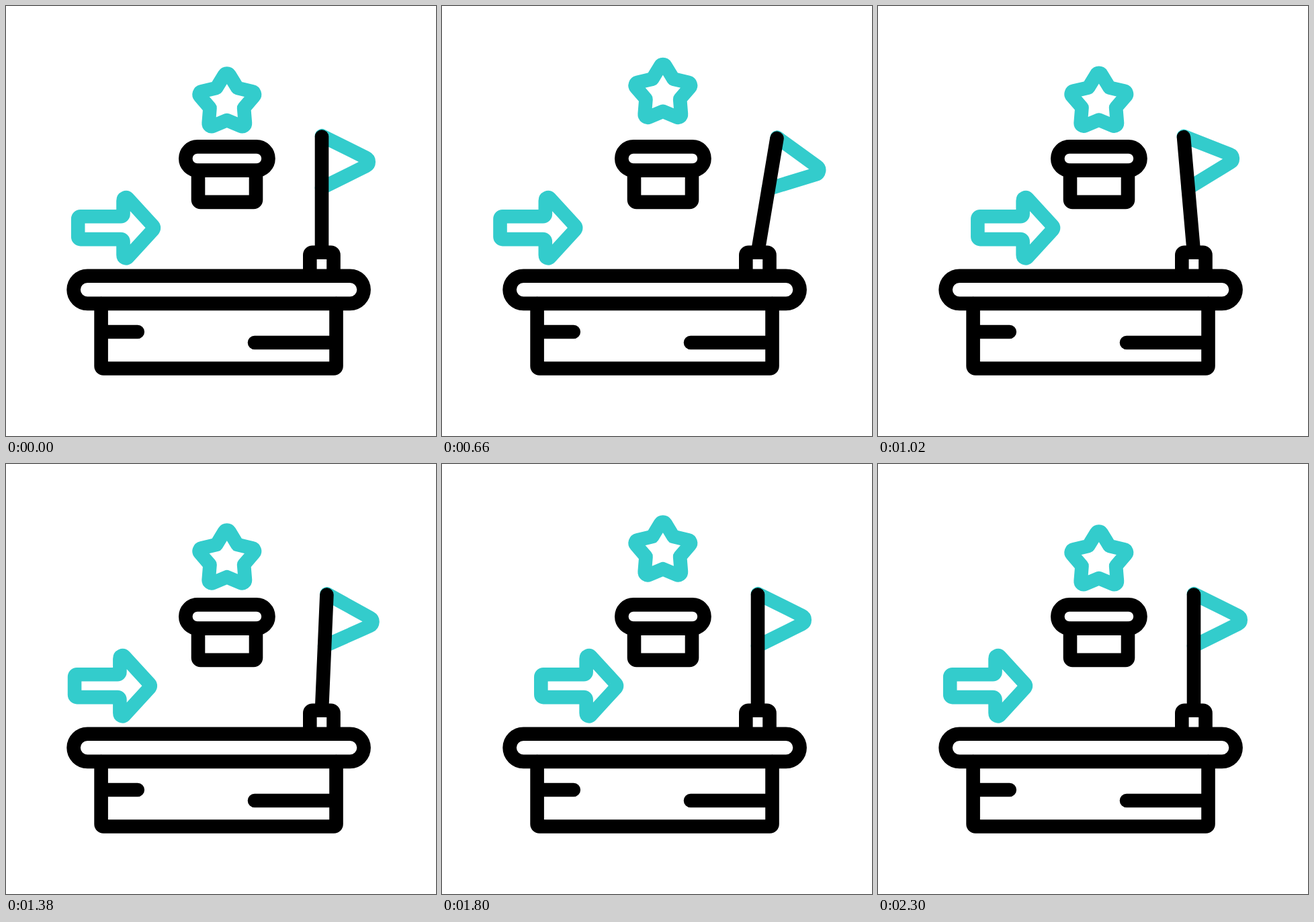
An HTML page that plays this animation: 640 by 640 pixels, repeating every 2400 ms.

```html
<!DOCTYPE html>
<html lang="en">
<head>
<meta charset="utf-8">
<title>Platform level</title>
<style>
  html, body { margin: 0; width: 100%; height: 100%; overflow: hidden; background: #fff; }
  svg { display: block; width: 100vw; height: 100vh; }
  g { fill: none; stroke-width: 20.6; stroke-linecap: round; stroke-linejoin: round; }
  .dark { stroke: #000; }
  .teal { stroke: #3cc; }
</style>
</head>
<body>
<svg viewBox="0 0 640 640">
  <g class="teal">
    <path id="star"/>
    <path id="arrow" d="M110.7 313.3H171a3.5 3.5 0 0 0 3.5-3.5V290c0-4.4 4.2-6.2 7.1-3.4L218.5 326.9q2.8 3.3 0 6.6L181.6 373.8c-2.9 2.8-7.1 1-7.1-3.4V350.6a3.5 3.5 0 0 0-3.5-3.5H110.7a3.5 3.5 0 0 1-3.5-3.5V316.8a3.5 3.5 0 0 1 3.5-3.5z"/>
  </g>
  <g id="flag">
    <path class="teal" d="M470 193.2L536 226c5 2.5 5 9.5 0 12L470 270.8"/>
    <path class="dark" d="M470 194.5V366.5"/>
  </g>
  <g class="dark">
    <rect x="267.3" y="209.4" width="123.2" height="35.2" rx="17.6"/>
    <path d="M286 245V288.4a3.5 3.5 0 0 0 3.5 3.5H368.5a3.5 3.5 0 0 0 3.5-3.5V245"/>
    <path d="M452.3 401V370.7a4 4 0 0 1 4-4H483.5a4 4 0 0 1 4 4V401"/>
    <rect x="100.6" y="401.7" width="432" height="41.2" rx="20.6"/>
    <path d="M141.6 443V536a3.5 3.5 0 0 0 3.5 3.5H488a3.5 3.5 0 0 0 3.5-3.5V443M141.6 485H195.8M370 501H491.5"/>
  </g>
</svg>
<script>
const LOOP = 2400, STEP = 20, LAST = 2300;
const $ = id => document.getElementById(id);
const star = $('star'), arrow = $('arrow'), flag = $('flag');

// Keyframes as [time, value], eased in and out.
const swing = [[0, 0], [350, -20], [685, 10], [1020, -5], [1355, 2.5], [1690, 0]];
const slide = [[0, 0], [362, 58.6], [735, -30], [1135, 59], [1511, -30], [1922, 59], [2300, 0]];
const bob = [[0, 0], [590, -14], [1180, 2.4], [1775, -14], [2300, 0]];

function valueAt(keys, t) {
  const i = keys.findIndex(k => k[0] > t);
  if (i < 0) return keys[keys.length - 1][1];
  const [t0, a] = keys[i - 1], [t1, b] = keys[i];
  const p = (t - t0) / (t1 - t0);
  return a + (b - a) * p * p * (3 - 2 * p);
}

// Five-pointed star with rounded tips and plain inner corners.
function starPath(cx, cy, outer, inner, cut, radius) {
  const at = (r, i) => {
    const a = (i * 36 - 90) * Math.PI / 180;
    return [cx + r * Math.cos(a), cy + r * Math.sin(a)];
  };
  const toward = (p, q) => {
    const k = cut / Math.hypot(q[0] - p[0], q[1] - p[1]);
    return [p[0] + (q[0] - p[0]) * k, p[1] + (q[1] - p[1]) * k];
  };
  let d = '';
  for (let i = 0; i < 10; i += 2) {
    const tip = at(outer, i), before = at(inner, i - 1), after = at(inner, i + 1);
    d += `${i ? 'L' : 'M'}${toward(tip, before)}A${radius} ${radius} 0 0 1 ${toward(tip, after)}L${after}`;
  }
  return d + 'Z';
}

star.setAttribute('d', starPath(328.8, 143.5, 47.2, 26.6, 7.4, 4.5));

function draw(now) {
  const t = Math.min(LAST, Math.floor((now % LOOP) / STEP) * STEP);
  star.setAttribute('transform', `translate(0 ${valueAt(bob, t)})`);
  arrow.setAttribute('transform', `translate(${valueAt(slide, t)} 0)`);
  flag.setAttribute('transform', `rotate(${valueAt(swing, t)} 470 366.5)`);
}

let start;
function tick(now) {
  start ??= now;
  draw(now - start);
  requestAnimationFrame(tick);
}
draw(0);
requestAnimationFrame(tick);
</script>
</body>
</html>
```
